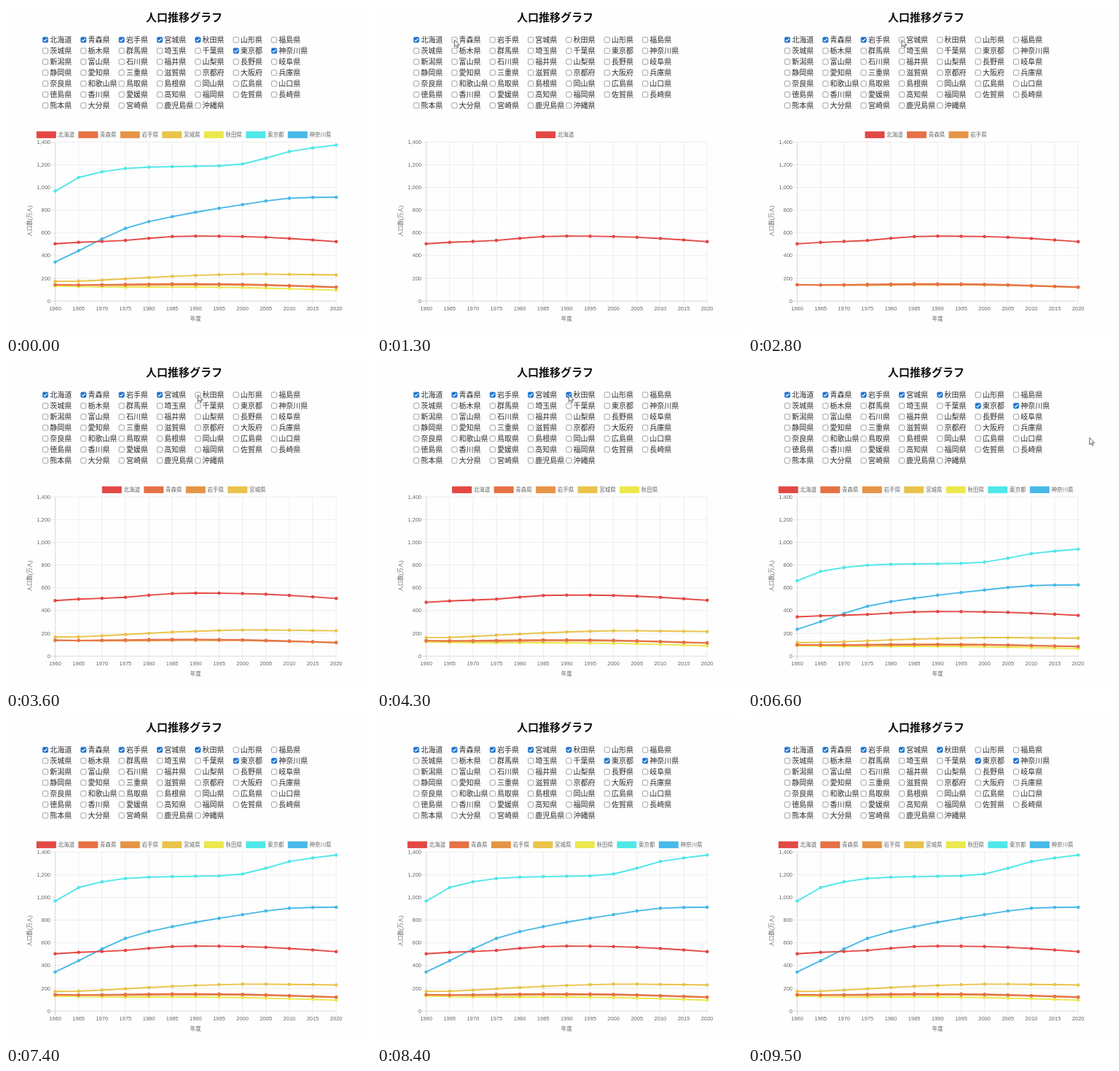
An HTML page for the animation above (9.6 s loop, 501 by 448 pixels).

```html
<!DOCTYPE html>
<html lang="ja">
<head>
<meta charset="utf-8">
<title>人口推移グラフ</title>
<style>
html, body { margin: 0; width: 100%; height: 100%; overflow: hidden; background: #fefefe; }
svg { display: block; width: 501px; height: 448px; }
.page { font: 10px "Noto Sans CJK JP", "Noto Sans CJK", sans-serif; fill: #2c2c2c; }
.title { font-size: 15px; font-weight: 700; fill: #111; text-anchor: middle; }
.chart { font: 7.5px "Liberation Sans", "Noto Sans CJK JP", "Noto Sans CJK", sans-serif; fill: #666; }
.mid { text-anchor: middle; }
.end { text-anchor: end; }
.grid { stroke: #000; stroke-opacity: .09; stroke-width: .8; fill: none; }
.axis { stroke-opacity: .18; }
.box { fill: #fff; stroke: #777; stroke-width: .7; }
.on .box { fill: #1f74d0; stroke: #1f74d0; }
.tick { fill: none; stroke: none; stroke-width: 1.2; }
.on .tick { stroke: #fff; }
.line { fill: none; stroke-width: 1.9; stroke-linejoin: round; }
.dots { fill: none; stroke-width: 4.6; stroke-linecap: round; }
</style>
</head>
<body>
<svg viewBox="0 0 501 448">
  <g class="page" id="page"><text class="title" x="244.5" y="20.8">人口推移グラフ</text></g>
  <g class="chart" id="chart"></g>
  <path id="cursor" d="M0 0V9.4L2.2 7.4L3.7 10.7L5.2 10L3.8 6.9H6.8Z" fill="#fff" stroke="#222" stroke-width=".7"/>
</svg>
<script>
const LOOP = 9600, POSTER = 100, RISE = 1000;
const LAG = 150, GLIDE = 250, AHEAD = 900;
const LEFT = 67.5, RIGHT = 453.2, TOP = 186.3, BASE = 404.3, MAX = 1400, LAST = 12;

const prefs = `北海道 青森県 岩手県 宮城県 秋田県 山形県 福島県
茨城県 栃木県 群馬県 埼玉県 千葉県 東京都 神奈川県
新潟県 富山県 石川県 福井県 山梨県 長野県 岐阜県
静岡県 愛知県 三重県 滋賀県 京都府 大阪府 兵庫県
奈良県 和歌山県 鳥取県 島根県 岡山県 広島県 山口県
徳島県 香川県 愛媛県 高知県 福岡県 佐賀県 長崎県
熊本県 大分県 宮崎県 鹿児島県 沖縄県`.split(/\s/);

// population at a few key steps; the steps between follow a smooth curve
const knots = [0, 1, 3, 5, 8, 10, 12];
const series = [
  { name: '北海道', color: '#e34845', draw: 300, keys: [504, 517, 534, 568, 568, 551, 523] },
  { name: '青森県', color: '#e67145', draw: 1480, keys: [143, 142, 147, 152, 148, 137, 124] },
  { name: '岩手県', color: '#e69447', draw: 1950, keys: [145, 141, 139, 143, 142, 133, 121] },
  { name: '宮城県', color: '#e9c34a', draw: 3020, keys: [174, 175, 196, 218, 237, 235, 230] },
  { name: '秋田県', color: '#ebe84c', draw: 3798, keys: [134, 128, 123, 125, 119, 109, 96] },
  { name: '東京都', color: '#50e7e9', draw: 5858, keys: [968, 1087, 1167, 1183, 1206, 1316, 1373] },
  { name: '神奈川県', color: '#48b9e7', draw: 6350, keys: [344, 443, 640, 743, 849, 905, 914] }
];

const byId = id => document.getElementById(id);
function add(parent, tag, attrs, text) {
  const el = document.createElementNS('http://www.w3.org/2000/svg', tag);
  for (const key in attrs) el.setAttribute(key, attrs[key]);
  if (text) el.textContent = text;
  return parent.appendChild(el);
}
const xAt = i => LEFT + (RIGHT - LEFT) * i / LAST;
const yAt = v => BASE - (BASE - TOP) * v / MAX;
const boxAt = i => ({ x: 50 + 52.35 * (i % 7), y: 42.4 + 15 * Math.floor(i / 7) });

// cubic Hermite curve through the keys
function valueAt(keys, i) {
  const end = knots.length - 1;
  const slope = k => {
    const a = Math.max(0, k - 1), b = Math.min(end, k + 1);
    return (keys[b] - keys[a]) / (knots[b] - knots[a]);
  };
  const k = Math.min(end, knots.findIndex(n => n > i) + end + 1) % (end + 1);
  const b = knots.findIndex(n => n >= i), a = Math.max(0, b - 1);
  if (knots[b] === i) return keys[b];
  const h = knots[b] - knots[a], u = (i - knots[a]) / h, e = u * u * (3 - 2 * u);
  return keys[a] + (keys[b] - keys[a]) * e
    + h * u * (1 - u) * ((1 - u) * slope(a) - u * slope(b));
}

const page = byId('page'), chart = byId('chart'), cursor = byId('cursor');

const boxes = prefs.map((name, i) => {
  const { x, y } = boxAt(i);
  const g = add(page, 'g', { transform: `translate(${x} ${y})` });
  add(g, 'rect', { class: 'box', x: .4, y: .4, width: 7.2, height: 7.2, rx: 1.4 });
  add(g, 'path', { class: 'tick', d: 'M1.7 4.2L3.3 5.8L6.4 2.2' });
  add(g, 'text', { x: 10.2, y: 7.8 }, name);
  return g;
});

for (let i = 0; i <= LAST; i++) {
  const x = xAt(i);
  add(chart, 'path', { class: i ? 'grid' : 'grid axis', d: `M${x} ${TOP}V${BASE + 6}` });
  add(chart, 'text', { class: 'mid', x, y: 417.4 }, String(1960 + 5 * i));
}
for (let v = 0; v <= MAX; v += 200) {
  const y = yAt(v);
  add(chart, 'path', { class: v ? 'grid' : 'grid axis', d: `M${LEFT - 6} ${y}H${RIGHT}` });
  add(chart, 'text', { class: 'end', x: 61, y: y + 2.4 }, v.toLocaleString('en-US'));
}
add(chart, 'text', { class: 'mid', x: 260.3, y: 430.8 }, '年度');
add(chart, 'text', { class: 'mid', transform: 'translate(35 294.4) rotate(-90)' }, '人口数(万人)');

// first series ends up on top
[...series].reverse().forEach(s => {
  s.line = add(chart, 'path', { class: 'line', stroke: s.color });
  s.dots = add(chart, 'path', { class: 'dots', stroke: s.color });
});
series.forEach(s => {
  const index = prefs.indexOf(s.name), { x, y } = boxAt(index);
  s.box = boxes[index];
  s.check = s.draw - LAG;
  s.stop = { x: x + 4, y: y + 4, due: s.check };
  s.data = Array.from({ length: LAST + 1 }, (_, i) => valueAt(s.keys, i));
  s.width = 35 + 7.5 * s.name.length;
  s.key = add(chart, 'g', {});
  add(s.key, 'rect', { y: 171.7, width: 27, height: 9.4, fill: s.color });
  add(s.key, 'text', { x: 29.6, y: 178.9 }, s.name);
});
const stops = [...series.map(s => s.stop), { x: 480, y: 110, due: 7300 }];

function drawChart(count, rise) {
  const total = series.slice(0, count).reduce((sum, s) => sum + s.width, 0);
  let x = 246.8 - total / 2;
  series.forEach((s, i) => {
    const shown = i < count;
    for (const el of [s.line, s.dots, s.key]) el.style.display = shown ? '' : 'none';
    if (!shown) return;
    const pts = s.data.map((v, k) => `${xAt(k).toFixed(2)} ${yAt(v * rise).toFixed(2)}`);
    s.line.setAttribute('d', 'M' + pts.join('L'));
    s.dots.setAttribute('d', pts.map(p => `M${p}h.01`).join(''));
    s.key.setAttribute('transform', `translate(${x} 0)`);
    x += s.width;
  });
}

// glide to each box well before its click, but not before the previous one
function moveCursor(t) {
  let { x, y } = stops[0], u = 0;
  for (let i = 1; i < stops.length; i++) {
    const leave = Math.max(stops[i - 1].due + 50, stops[i].due - AHEAD);
    u = Math.min(1, Math.max(0, (t - leave) / GLIDE));
    const e = u * u * (3 - 2 * u);
    x += (stops[i].x - x) * e;
    y += (stops[i].y - y) * e;
  }
  cursor.style.display = t < POSTER || u === 1 ? 'none' : '';
  cursor.setAttribute('transform', `translate(${x} ${y})`);
}

function render(t) {
  const poster = t < POSTER;
  series.forEach(s => s.box.classList.toggle('on', poster || t >= s.check));
  const count = poster ? series.length : series.filter(s => t >= s.draw).length;
  const u = poster || !count ? 1 : Math.min(1, (t - series[count - 1].draw) / RISE);
  drawChart(count, 1 - (1 - u) ** 4);
  moveCursor(t);
}

const begin = performance.now();
function tick() {
  render((performance.now() - begin) % LOOP);
  requestAnimationFrame(tick);
}
tick();
</script>
</body>
</html>
```
